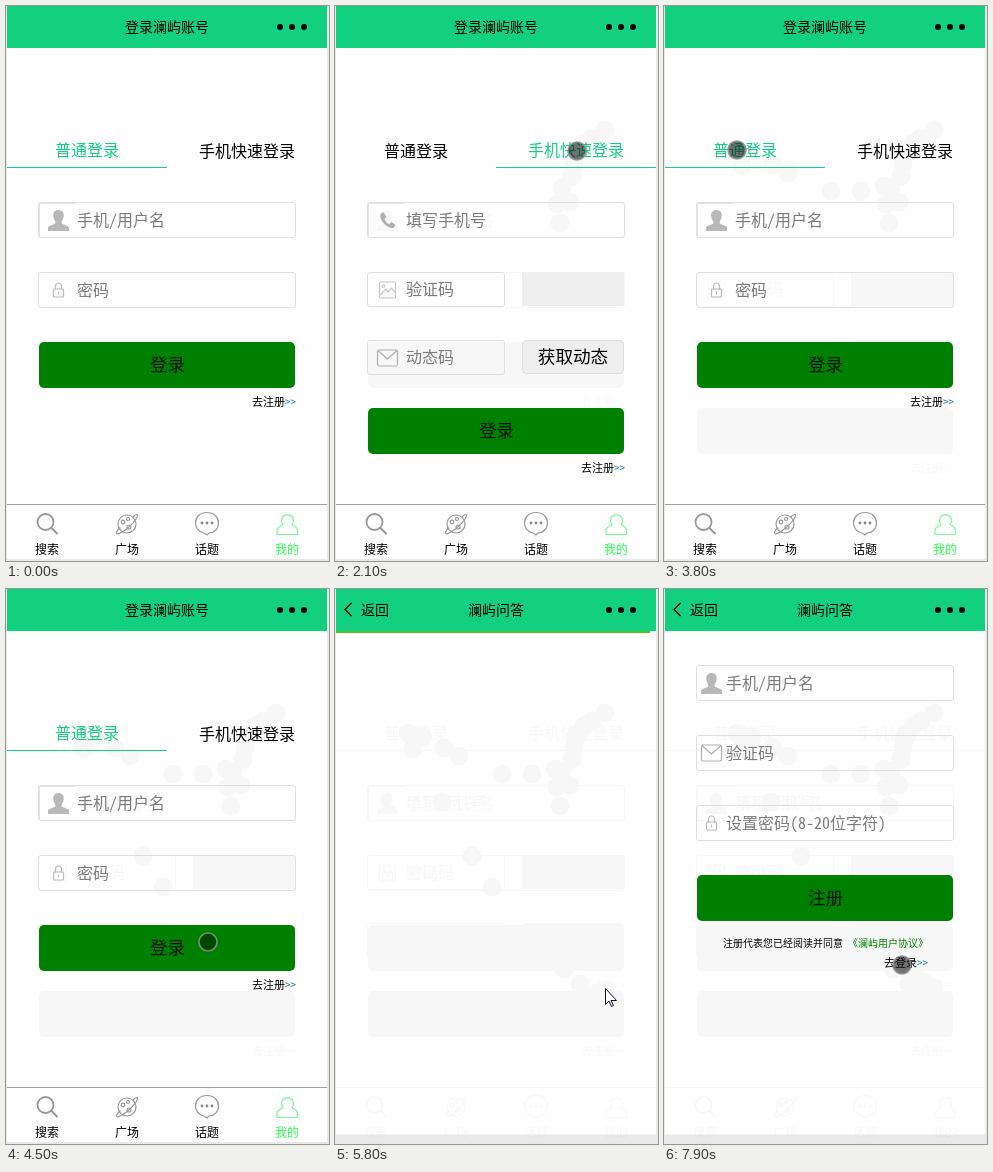
Animation, 323 px wide and 555 px high, one loop 8 s. Source, as an HTML page:

```html
<!DOCTYPE html>
<html lang="zh-CN">
<head>
<meta charset="utf-8">
<style>
html, body { margin: 0; width: 100%; height: 100%; overflow: hidden; background: #e9e9e9; }
svg { display: block; width: 323px; height: 555px; }
text { font-family: 'Noto Sans Mono CJK SC', 'Noto Sans CJK SC', 'Noto Sans CJK', sans-serif; font-weight: 300; }
.mid { text-anchor: middle; }
.hint { font-size: 16px; fill: #7c7c7c; }
.box { fill: none; stroke: #e0e0e0; }
.line { fill: none; stroke: #999; stroke-width: 1.2; stroke-linecap: round; stroke-linejoin: round; }
</style>
</head>
<body>
<svg id="stage" viewBox="0 0 323 555" xmlns="http://www.w3.org/2000/svg">
  <defs>
    <path id="user" fill="#b8b8b8" d="M0-10C-4-10-6-7-5-3C-5-1-3 1-3 3C-4 5-10.500 5-10.500 8V11H10.500V8C10.500 5 4 5 3 3C3 1 5-1 5-3C6-7 4-10 0-10Z"/>
    <g id="lock" class="line" style="stroke:#bbb;stroke-width:1.2">
      <rect x="-5" y="-1" width="10" height="8" rx="1"/>
      <path d="M-3-1V-4A3 3 0 0 1 3-4V-1M0 2V4"/>
    </g>
    <path id="phone" fill="#b0b0b0" d="M-7-6L-4-8L-1-3L-3-1C-2 2 0 4 2 4L4 2L8 5L6 8C1 9-9 1-7-6Z"/>
    <g id="photo" class="line" style="stroke:#c4c4c4;stroke-width:1.1">
      <rect x="-8" y="-8" width="16" height="16" rx="1"/>
      <path d="M-7 5L-2-1L1 2L4-2L8 3"/><circle cx="-4" cy="-4" r="1.3"/>
    </g>
    <g id="mail" class="line" style="stroke:#b0b0b0">
      <rect x="-10" y="-8" width="20" height="16" rx="1.5"/><path d="M-9-7L0 1L9-7"/>
    </g>

    <g id="passForm"></g>
    <g id="codeForm"></g>
    <g id="signForm"></g>
    <g id="nav">
      <path d="M1 498.5H321" stroke="#a0a0a0"/>
      <g class="line">
        <circle cx="39.500" cy="516" r="8" style="stroke-width:1.8"/><path d="M45.500 522L51 527.500" style="stroke-width:2"/>
        <circle cx="121" cy="518" r="9"/>
        <path d="M127 511C131 507 133 508 130 513C126 519 118 526 112 528C109 528 111 524 114 522"/>
        <circle cx="117" cy="516" r="1.8"/><circle cx="122" cy="513" r="1.5"/><circle cx="123" cy="521" r="2"/>
        <path d="M198 527C192 526 189.500 521 189.500 517C189.500 511 194 506.500 201 506.500S212.500 511 212.500 517C212.500 523 208 527 203 527L201 529Z"/>
      </g>
      <g fill="#888"><circle cx="196" cy="517" r="1.4"/><circle cx="201" cy="517" r="1.4"/><circle cx="206" cy="517" r="1.4"/></g>
      <path class="line" style="stroke:#7dfa96" d="M277 518.500A6 6 0 1 1 286 518.500C288 520 291.500 521 291.500 524V528.500H271V524C271 521 275 520 277 518.500Z"/>
      <g class="mid" font-size="12">
        <text x="41" y="548">搜索</text><text x="121" y="548">广场</text>
        <text x="201" y="548">话题</text><text x="281" y="548" fill="#2dff55">我的</text>
      </g>
    </g>
    <g id="tabs" font-size="16">
      <text class="mid" x="81" y="150">普通登录</text>
      <text class="mid" x="241" y="150">手机快速登录</text>
    </g>
  </defs>

  <rect x="1" width="320" height="553" fill="#fefefe" id="sheet"/>
  <g id="ghost" opacity=".024" style="filter:brightness(0)">
    <use href="#passForm" id="ghostPass"/>
    <use href="#codeForm" id="ghostCode"/>
    <g id="ghostPage"><use href="#nav"/><use href="#tabs"/><path d="M1 161.5H321" stroke="#000"/></g>
    <g id="trail"></g>
  </g>
  <g id="login">
    <path id="rule" stroke="#13d081"/>
    <g font-size="16" class="mid">
      <text id="tabPass" x="81">普通登录</text>
      <text id="tabCode" x="241">手机快速登录</text>
    </g>
    <use href="#passForm" id="pass"/>
    <use href="#codeForm" id="code"/>
    <use href="#nav"/>
  </g>
  <use href="#signForm" id="sign"/>
  <rect id="scroll" x="315" y="45" width="3" height="460" fill="#c8c8c8"/>
  <g id="head">
    <rect x="1" width="320" height="42" fill="#13d081"/>
    <text id="title" class="mid" x="161" y="26" font-size="14"></text>
    <g id="back">
      <path d="M16.500 14L10 20.500L16.500 27" fill="none" stroke="#000" stroke-width="1.3"/>
      <text x="26" y="26" font-size="14">返回</text>
    </g>
    <circle cx="274" cy="21" r="3"/><circle cx="286" cy="21" r="3"/><circle cx="298" cy="21" r="3"/>
  </g>
  <rect id="bar" x="1" y="42" height="2" fill="#4fc12c"/>
  <circle id="dot" r="9" stroke="#8f8f8f" stroke-opacity=".85" stroke-width="1.6"/>
  <path id="arrow" d="M270.500 399.500V415.500L274 412L276.500 417.500L278.500 416.500L276 411.500H281.500Z" fill="#fff" stroke="#112"/>
</svg>
<script>
const LOOP = 8000, STEP = 100;
const $ = id => document.getElementById(id);

const field = (y, label, icon, { w = 257, h = 35, x = 71, gap = 18.5 } = {}) => `
  <rect class="box" x="32.5" y="${y + .5}" width="${w}" height="${h}" rx="2.5"/>
  <use href="#${icon}" x="${x - gap}" y="${y + 18}"/>
  <text class="hint" x="${x}" y="${Math.floor(y + h / 2 + 6.5)}">${label}</text>`;
const button = (y, label) => `
  <rect x="33" y="${y}" width="256" height="46" rx="5" fill="#008000"/>
  <text class="mid" x="161.5" y="${y + 29}" font-size="17.6" fill-opacity=".85">${label}</text>`;
const link = (x, y, label) =>
  `<text x="${x}" y="${y}" font-size="11">${label}<tspan fill="#1c6ea4">&gt;&gt;</tspan></text>`;

const edge = '<path d="M33.5 231V197.5H70" fill="none" stroke="#e4e4e4"/>';
const short = { w: 137, h: 34 }, tight = { x: 62, gap: 14.5 };

$('passForm').innerHTML = edge + field(196, '手机/用户名', 'user') + field(266, '密码', 'lock')
  + button(336, '登录') + link(246, 400, '去注册');
$('codeForm').innerHTML = edge + field(196, '填写手机号', 'phone')
  + field(266, '验证码', 'photo', short) + field(334, '动态码', 'mail', short)
  + `<rect x="187" y="266" width="102" height="34" fill="#eee"/>
  <rect x="187.5" y="334.5" width="101" height="33" rx="4" fill="#eee" stroke="#dcdcdc"/>
  <text class="mid" x="238" y="357" font-size="17.6">获取动态</text>`
  + button(402, '登录') + link(246, 466, '去注册');
$('signForm').innerHTML = field(76, '手机/用户名', 'user', tight) + field(146, '验证码', 'mail', tight)
  + field(216, '设置密码(8-20位字符)', 'lock', tight) + button(286, '注册')
  + `<g font-size="10" style="font-weight:500"><text x="59" y="358">注册代表您已经阅读并同意</text>
  <text x="184" y="358" fill="#008000">《澜屿用户协议》</text></g>` + link(220, 378, '去登录');

// pointer strokes: start time, then one point per step
const strokes = [
  [200, [270,124], [257,132], [249,137], [243,146], [240,151]],
  [900, [239,158], [237,170], [227,182], [222,198], [225,217], [235,196], [237,170], [249,137], [242,145]],
  [2300, [240,150], [237,170], [220,180], [197,185], [167,185], [124,167], [109,159], [78,160], [75,145]],
  [3200, [73,144]],
  [4000, [76,146], [88,148], [107,213], [137,267], [157,298], [202,353], [229,380], [245,395], [255,407]],
  [4900, [262,404], [270,401]],
  [7000, [270,399], [268,398], [263,395], [257,391], [250,386], [244,381], [240,378], [238,376]]
];
const path = strokes.flatMap(([start, ...pts]) => pts.map(([x, y], i) => ({ t: start + i * STEP, x, y })));
$('trail').innerHTML = path.map(p => `<circle cx="${p.x}" cy="${p.y}" r="9.5"/>`).join('');
const marks = [...$('trail').children];

const show = (id, on) => $(id).setAttribute('visibility', on ? 'visible' : 'hidden');
const set = (id, attrs) => { for (const k in attrs) $(id).setAttribute(k, attrs[k]); };
const within = (t, a, b) => t >= a && t < b;
const tab = (id, active) => set(id, { fill: active ? '#13d081' : '#000', y: active ? 150 : 151 });

function draw(time) {
  const t = Math.floor(time % LOOP / STEP) * STEP;
  const onLogin = t < 5400, byCode = within(t, 2100, 3800);

  set('sheet', { height: onLogin ? 553 : 545.5 });
  $('login').style.display = onLogin ? '' : 'none';
  $('pass').style.display = byCode ? 'none' : '';
  $('code').style.display = byCode ? '' : 'none';
  set('rule', { d: byCode ? 'M161 161.5H321' : 'M1 161.5H161' });
  tab('tabPass', !byCode);
  tab('tabCode', byCode);

  show('ghostPass', t >= 2100);
  show('ghostCode', t >= 3800);
  show('ghostPage', !onLogin);

  $('head').style.display = within(t, 5400, 5800) ? 'none' : '';
  $('title').textContent = onLogin ? '登录澜屿账号' : '澜屿问答';
  show('back', !onLogin && t >= 5800);
  show('bar', within(t, 5800, 6000));
  set('bar', { width: t < 5900 ? 314 : 320 });
  show('sign', t >= 6400);
  set('scroll', { opacity: t < 6400 ? 0 : Math.min(1, Math.max(0, (7400 - t) / 400)) });

  let last = null;
  path.forEach((p, i) => {
    if (p.t <= t) last = p;
    marks[i].setAttribute('visibility', p.t < t ? 'visible' : 'hidden');
  });
  const arrow = within(t, 5400, 6700);
  const pressed = within(t, 1700, 2300) || within(t, 3200, 4000) || within(t, 5200, 5400) || t >= 7900;
  show('arrow', arrow);
  show('dot', last && !arrow);
  if (last) set('dot', { cx: last.x, cy: last.y, 'fill-opacity': pressed ? .54 : .44 });
}

const begin = performance.now();
function tick() {
  draw(performance.now() - begin);
  requestAnimationFrame(tick);
}
draw(0);
requestAnimationFrame(tick);
</script>
</body>
</html>
```
